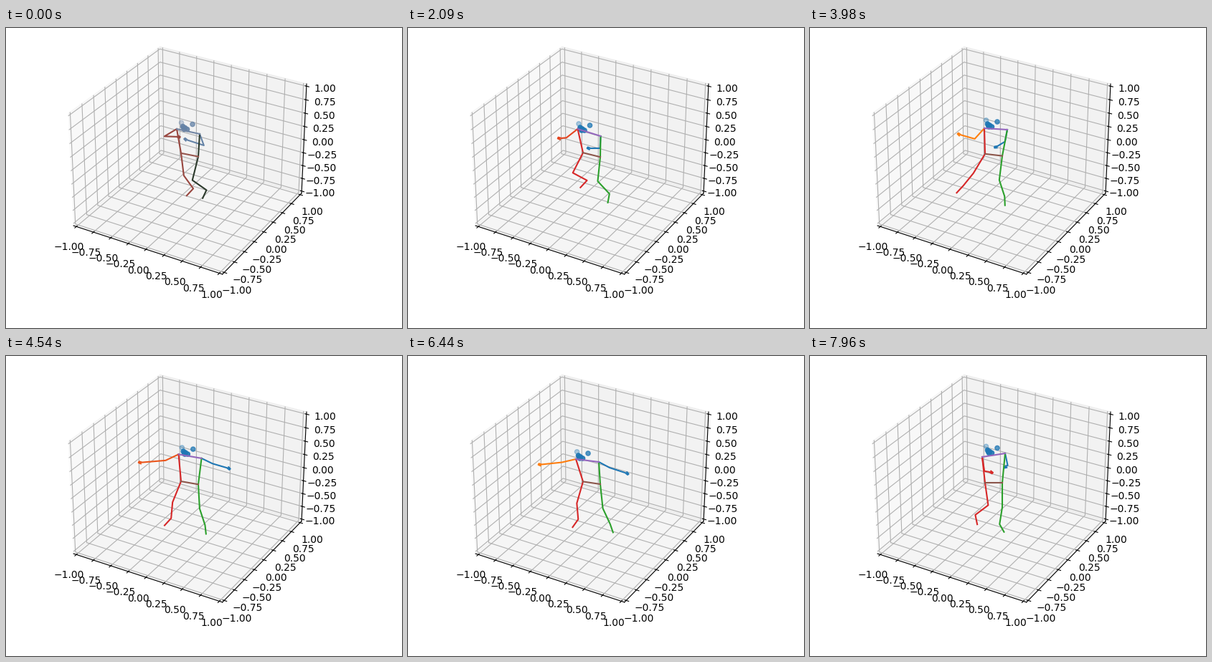
Write a matplotlib script that moves like this. It is 552 by 419 pixels and loops after 8 s.

```python
import numpy as np
import matplotlib.pyplot as plt
from matplotlib.animation import FuncAnimation
from matplotlib.colors import to_rgb

W, H, DPI = 552, 419, 100
FRAME_MS, LOOP_MS = 40, 8000
STEP_MS = 74.02  # the pose is sampled slower than the screen refresh

# key poses: pixels for the chest, degrees (clockwise from +x) for the bones
TIMES = [0, 1080, 2090, 3980, 5220, 6440, 7960]
POSES = {
    "chest_x": [254, 253.5, 252.5, 259, 253.5, 250, 256],
    "chest_y": [144.5, 143.5, 146, 141, 139, 146, 138.5],
    "tilt": [3.5, 4.5, 5, 1, 5, 2, -2.5],
    "turn": [2, 0, -3, -2, 3, -3, 1],
    "r_upper": [149, 145, 142, 132, 140, 167, 81],
    "r_fore": [2, 5, 175, 196, 190, 174, 10],
    "r_reach": [22, 21, 12, 25, 28, 33, 12],
    "l_upper": [70, 75, 93, 101, 80, 28, 78],
    "l_fore": [198, 196, 180, 149, 78, 18, 141],
    "l_reach": [29, 26, 18, 17, 14, 28, 6],
    "r_thigh": [83, 85, 117, 121, 101, 106, 82],
    "r_shin": [54, 62, 28, 129, 71, 85, 143],
    "l_thigh": [104, 104, 96, 97, 74, 84, 90],
    "l_shin": [35, 55, 47, 72, 39, 65, 99],
}
# the arms swing open and the legs stretch halfway between later poses
OPEN = {"r_upper": 155, "r_fore": 175, "r_reach": 38,
        "l_upper": 25, "l_fore": 15, "l_reach": 26,
        "r_shin": 95, "l_shin": 72}
SWING_FROM = 2

PELVIS = np.array([256, 177.2])
FAR_EAR, NEAR_EAR, FACE = (-11.5, -12.2), (4, -10), (-6.5, -5)
FEATURES = np.array([[-3, -2], [3, 2], [-1, 2], [0, 0], [-2, 0]])
ALPHAS = [0.35, 0.75] + [0.9] * len(FEATURES)

COLORS = [to_rgb(f"C{i}") for i in range(6)]
MUTED = [to_rgb(c) for c in ("#6482a6", "#98463f", "#2c3a2c",
                             "#98463f", "#7286a4", "#96554d")]
FADE_MS = 400


def mix(a, b, k):
    return (1 - k) * np.asarray(a) + k * np.asarray(b)


def pose_at(t):
    i = min(np.searchsorted(TIMES, t, side="right"), len(TIMES) - 1) - 1
    u = np.clip((t - TIMES[i]) / (TIMES[i + 1] - TIMES[i]), 0, 1)
    ease = u * u * (3 - 2 * u)
    pose = {name: mix(v[i], v[i + 1], ease) for name, v in POSES.items()}
    if i >= SWING_FROM:
        swing = np.sin(np.pi * u) ** 2
        pose.update({name: mix(pose[name], v, swing) for name, v in OPEN.items()})
    return pose


def limb(start, *bones):
    """Joints of a chain of (length, angle) bones."""
    length, angle = np.array(bones, float).T
    angle = np.radians(angle)
    steps = np.column_stack([length * np.cos(angle), length * np.sin(angle)])
    return np.vstack([start, start + np.cumsum(steps, axis=0)])


def add_hand(arm, angle):
    """Replace the end of an arm with a small pointed hand."""
    a = np.radians(angle)
    along, side = np.array([np.cos(a), np.sin(a)]), np.array([-np.sin(a), np.cos(a)])
    tip = arm[-1]
    hand = [tip - 5 * along, tip - along + 1.6 * side, tip, tip - 3 * along - 1.6 * side]
    return np.vstack([arm[:-1], hand])


def skeleton(t):
    p = pose_at(t)
    u = t / LOOP_MS
    chest = np.array([p["chest_x"], p["chest_y"]])
    half = np.array([16, p["tilt"]])
    hip = np.array([12, 1 + 0.4 * p["tilt"]])
    rs, ls = chest - half, chest + half
    rh, lh = PELVIS - hip, PELVIS + hip

    r_arm = limb(rs, (20, p["r_upper"]), (p["r_reach"], p["r_fore"]))
    l_arm = limb(ls, (17, p["l_upper"]), (p["l_reach"], p["l_fore"]))
    r_foot = 133 - 57 * u ** 9  # the toes turn inward late
    l_foot = 115 - 55 * u
    r_leg = limb(rh, (31.5, p["r_thigh"]), (22.5, p["r_shin"]), (13.5, r_foot))
    l_leg = limb(lh, (34, p["l_thigh"]), (24, p["l_shin"]), (12.5, l_foot))

    paths = [add_hand(l_arm, p["l_fore"]), add_hand(r_arm, p["r_fore"]),
             np.vstack([ls, l_leg]), np.vstack([rs, r_leg]),
             np.array([ls, rs]), np.array([lh, rh])]
    head = chest + np.array([p["turn"], 0])
    points = np.vstack([head + FAR_EAR, head + NEAR_EAR, head + FACE + FEATURES])
    return paths, points


fig = plt.figure(figsize=((W + 0.01) / DPI, (H + 0.01) / DPI), dpi=DPI, facecolor="white")

SIDE, LEFT, BOTTOM = 369.6, 66.2, 51.8
box = fig.add_axes([LEFT / W, BOTTOM / H, SIDE / W, SIDE / H], projection="3d")
lim = 25 / 24
box.set(xlim=(-lim, lim), ylim=(-lim, lim), zlim=(-lim, lim))
for axis in (box.xaxis, box.yaxis, box.zaxis):
    axis.set_ticks(np.linspace(-1, 1, 9))

# the figure is laid out in stage pixels, over the projected box
stage = fig.add_axes([0, 0, 1, 1])
stage.set(xlim=(0, W), ylim=(H, 0))
stage.axis("off")
dots = stage.scatter(np.zeros(len(ALPHAS)), np.zeros(len(ALPHAS)), s=20,
                     linewidths=1, zorder=1)
lines = [stage.plot([], [], lw=1.5, color=c, zorder=2)[0] for c in COLORS]


def update(frame):
    step = round((frame * FRAME_MS - 40) / STEP_MS)
    t = max(0, 40 + step * STEP_MS)
    paths, points = skeleton(t)

    fade = max(0, 1 - t / FADE_MS)
    colors = [mix(c, m, fade) for c, m in zip(COLORS, MUTED)]
    warmth = 0.5 + 0.5 * np.cos(2 * np.pi * (t - 5220) / 2600)
    colors[1] = mix(colors[1], colors[3], warmth)
    for line, path, color in zip(lines, paths, colors):
        line.set_data(path[:, 0], path[:, 1])
        line.set_color(tuple(color))

    dots.set_offsets(points)
    shades = [(*colors[0], a) for a in ALPHAS]
    dots.set_facecolor(shades)
    dots.set_edgecolor(shades)
    return [dots, *lines]


anim = FuncAnimation(fig, update, frames=LOOP_MS // FRAME_MS, interval=FRAME_MS,
                     repeat=True, repeat_delay=0, blit=False)
plt.show()
```
